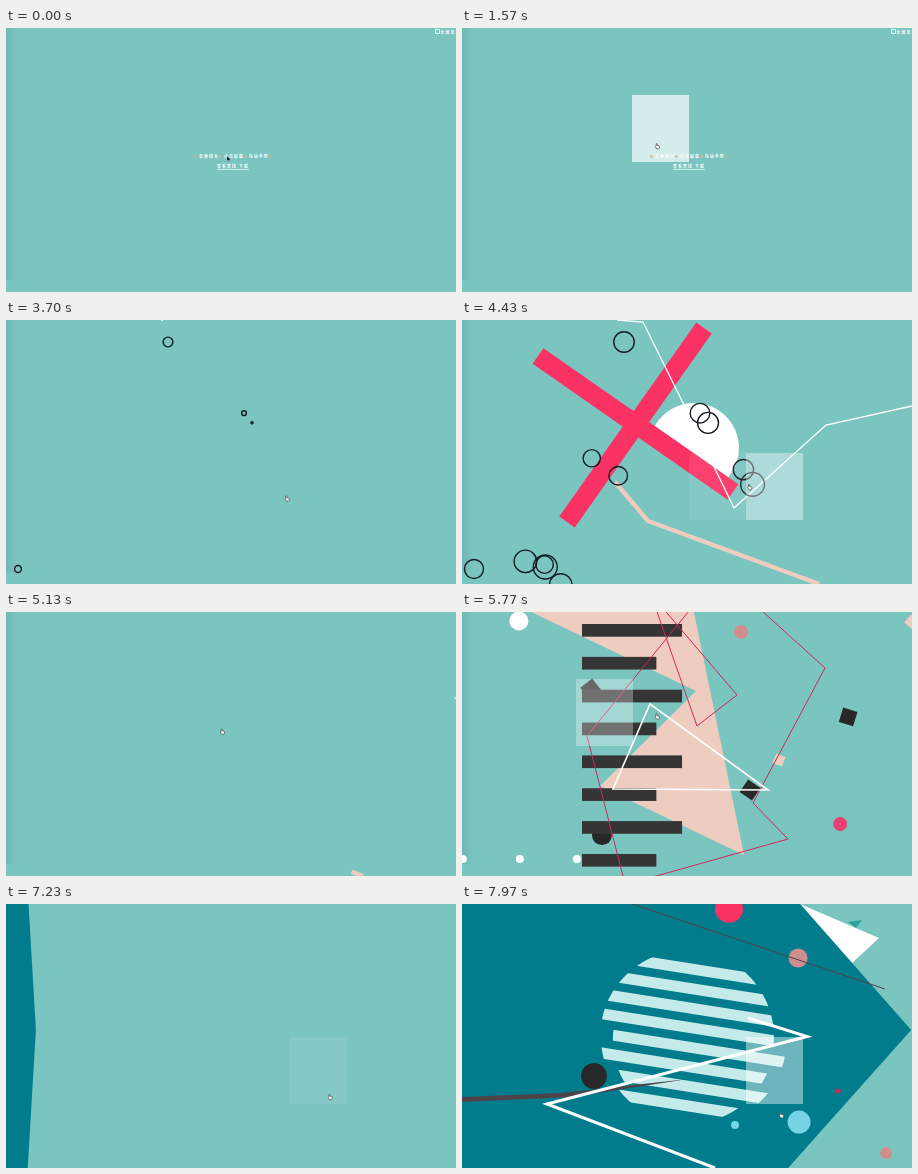
Write an HTML page with a canvas that moves like this. It is 450x264 px and loops after 8 s.

```html
<!DOCTYPE html>
<html lang="zh">
<head>
<meta charset="utf-8">
<title>Touch and play</title>
<style>
  html, body { margin: 0; width: 100%; height: 100%; overflow: hidden; background: #7bc5c1; }
  canvas, svg, #intro { position: absolute; left: 0; top: 0; }
  #intro { width: 450px; height: 264px; overflow: hidden; color: #fff;
    font: 700 4px/6px "Noto Sans CJK SC", "Noto Sans CJK", sans-serif; letter-spacing: 1px; white-space: nowrap; }
  #intro p { position: absolute; margin: 0; }
  #intro i { display: inline-block; width: 3px; height: 3px; margin: 0 2px 0 0; border-radius: 50%;
    background: #e8a582; opacity: .7; vertical-align: middle; }
  #intro u { text-decoration: underline .5px rgba(255,255,255,.6); }
  #intro b { display: inline-block; width: 2.6px; height: 2.6px; margin-right: 1px; border: .5px solid #dff; }
</style>
</head>
<body>
<canvas id="stage" width="450" height="264"></canvas>
<div id="intro">
  <p style="left:429px;top:1px"><b></b>全屏显示</p>
  <p style="left:188px;top:125px"><i></i>音量调大<i></i>点击屏幕<i></i>拖动手势<i></i></p>
  <p style="left:211px;top:135px"><u>查看查找 下载</u></p>
</div>
<svg width="8" height="8" stroke-width=".6">
  <path id="arrow" d="M0 0V5L1.2 4L2 5.8L2.9 5.4L2.2 3.7H3.7Z" fill="#111" stroke="#fff" stroke-width=".25"/>
  <path id="hand" d="M1.2 3V.6Q1.8 0 2.2 .7V2.3Q4.6 2.2 4.6 3.6Q4.7 5.7 3.7 6H1.8L.2 3.7Q.4 2.9 1.2 3Z" fill="#eee" stroke="#333"/>
</svg>
<script>
const ctx = document.getElementById('stage').getContext('2d');
const intro = document.getElementById('intro');
const pointer = document.querySelector('svg');
const arrow = document.getElementById('arrow');
const hand = document.getElementById('hand');

const LOOP = 8000, W = 450, H = 264, MID = [225, 132];
const BASE = '#7bc5c1', PALE = '#c4ebe9', DEEP = '#007c8c', BLUE = '#1192a9', DARK = '#4e4349', INK = '#353535',
      BLACK = '#282828', PEACH = '#efccc0', PINK = '#fa3364', RED = '#d0285a', ROSE = '#cf8e8d', SKY = '#77d3e6';

const span = (t, a, b) => Math.min(1, Math.max(0, (t - a) / (b - a)));
const out = u => 1 - (1 - u) ** 3;
const smooth = u => u * u * (3 - 2 * u);
const mix = (a, b, u) => a + (b - a) * u;
const noise = n => { const v = Math.sin(n * 12.9898) * 43758.5453; return v - Math.floor(v); };
const times = (n, fn) => Array.from({ length: n }, (_, i) => fn(i));
// Eased entry, then eased exit
const pulse = (t, a, b, c, d) => out(span(t, a, b)) * (1 - smooth(span(t, c, d)));
const zoom = (pts, k, [cx, cy] = MID) => pts.map(([x, y]) => [mix(cx, x, k), mix(cy, y, k)]);

function trace(pts) {
  ctx.beginPath();
  pts.forEach(p => ctx.lineTo(...p));
}
function poly(pts, color) {
  trace(pts);
  ctx.fillStyle = color;
  ctx.fill();
}
function outline(pts, color, width) {
  trace(pts);
  ctx.closePath();
  ctx.strokeStyle = color;
  ctx.lineWidth = width;
  ctx.stroke();
}
function rect(x, y, w, h, color) {
  ctx.fillStyle = color;
  ctx.fillRect(x, y, w, h);
}
function arc(x, y, r, color, from = 0, to = 7) {
  ctx.beginPath();
  ctx.arc(x, y, r, from, to);
  ctx.fillStyle = color;
  ctx.fill();
}
function square(x, y, size, angle, color) {
  ctx.save();
  ctx.translate(x, y);
  ctx.rotate(angle);
  rect(-size / 2, -size / 2, size, size, color);
  ctx.restore();
}
// Line whose head runs during a–b and whose tail follows during c–d
function sweep(t, a, b, c, d, pts, color, width) {
  const head = out(span(t, a, b)), tail = smooth(span(t, c, d));
  if (head <= tail) return;
  const len = pts.slice(1).reduce((sum, [x, y], i) => sum + Math.hypot(x - pts[i][0], y - pts[i][1]), 0);
  ctx.setLineDash([(head - tail) * len, len * 2]);
  ctx.lineDashOffset = -tail * len;
  trace(pts);
  ctx.strokeStyle = color;
  ctx.lineWidth = width;
  ctx.stroke();
  ctx.setLineDash([]);
}
// Bar that fills left to right, then empties the same way
function bar(y, h, fill, empty, color) {
  if (fill > empty) rect(120 + 214 * empty, y, 214 * (fill - empty), h, color);
}
function rings(t, start, end, color, centres, min, max) {
  const fade = 1 - span(t, end, end + 400);
  if (!fade) return;
  centres.forEach(([x, y], i) => {
    const from = start + i * 22, k = out(span(t, from, from + 420));
    if (!k) return;
    ctx.beginPath();
    ctx.arc(x, y, mix(min, max, noise(i + 3)) * k, 0, 7);
    ctx.strokeStyle = color;
    ctx.lineWidth = 1.4 * fade;
    ctx.stroke();
  });
}
// Returns a painter for bits that fly out of an origin and reach their places at the key time
function burst(t, start, key, end, origin = MID) {
  const live = t > start && t < end;
  const k = out(span(t, start, end)) / out(span(key, start, end));
  const scale = 1 - smooth(span(t, mix(key, end, .3), end));
  return (pts, size, color, angle) => live && zoom(pts, k, origin).forEach(([x, y], i) => {
    if (angle === undefined) arc(x, y, size * scale, color);
    else square(x, y, size * scale, angle + i * .3 + (t - key) * .0026, color);
  });
}

function bubbles(t) {
  rings(t, 1950, 3050, '#3a3743',
    [[169, 43], [279, 43], [365, 28], [436, 89], [65, 103], [369, 154], [94, 245]], 8, 14);
  // A wide zigzag arch
  const arch = times(11, i => {
    const u = i / 5 - 1;
    return [217 + 90 * u + 125 * u ** 3, 228 - 150 * Math.sin(Math.PI * i / 10) * (i % 2 ? 1 : .45)];
  });
  rings(t, 2150, 3050, '#1aa294', arch, 4, 10);
  const k = pulse(t, 2350, 2850, 3150, 3550);
  poly(zoom([[169, 104], [243, 87], [267, 104], [257, 148], [258, 167], [216, 179], [163, 156]], k), BLUE);
}

function strike(t) {
  arc(232, 128, 45 * pulse(t, 3750, 4150, 4650, 4950), '#fff', Math.PI * 1.12, Math.PI * 2.27);
  sweep(t, 3800, 4150, 4700, 5000, [[242, 8], [105, 202]], PINK, 19);
  sweep(t, 3950, 4350, 4800, 5100, [[76, 36], [271, 172]], PINK, 19);
  sweep(t, 3700, 4350, 4600, 5150,
    [[155, 0], [181, 2], [222, 85], [272, 188], [364, 105], [450, 86]], '#fff', 1.3);
  sweep(t, 3850, 4420, 4700, 5200, [[153, 162], [186, 201], [357, 264]], PEACH, 4.3);
  // Rings come in loose pairs
  const pairs = [[242, 98], [143, 147], [286, 157], [73, 243], [91, 256]]
    .flatMap(([x, y], i) => [-1, 1].map(s => [x + s * mix(4, 14, noise(i)), y + s * mix(0, 9, noise(i + 9))]));
  rings(t, 3620, 4560, '#171c20', [[162, 22], [12, 249], ...pairs], 8, 12);
}

function prism(t) {
  const clay = pulse(t, 5150, 5600, 5900, 6250);
  poly(zoom([[40, -14], [229, -14], [282, 243], [138, 174], [234, 79]], clay), PEACH);

  const bits = burst(t, 5250, 5770, 6300);
  bits([[57, 9]], 9.5, '#fff');
  bits([[279, 20]], 7, ROSE);
  bits([[378, 212]], 7, '#e8406f');
  bits([[140, 223]], 10, BLACK);
  bits([[386, 105], [288, 178], [129, 77]], 15, BLACK, .3);
  bits([[317, 148], [449, 10]], 10, PEACH, .4);
  bits(times(3, i => [1 + 57 * i, 247]), 4, '#fff');

  for (let i = 0; i < 8; i++) {
    const from = i % 2 ? 5632 : 5584;
    bar(12 + i * 32.85, 12.7, span(t, from, from + 400), span(t, from + 400, from + 800), INK);
  }

  const grow = span(t, 5350, 5770) ** 2 + 5 * span(t, 5770, 6270) ** 2;
  if (!grow || t > 6270) return;
  outline(zoom([[288, -12], [363, 56], [291, 191], [326, 227], [180, 268], [162, 268], [125, 124], [236, -12]],
    grow), RED, 1);
  outline(zoom([[193, -6], [235, 114], [275, 83], [199, -6]], grow), RED, 1);
  outline(zoom([[188, 92], [306, 178], [151, 177]], grow), '#fff', 1.6);
}

function pistons(t) {
  const left = W * (1 - smooth(span(t, 6030, 6300))), right = W * (1 - smooth(span(t, 6780, 7080)));
  if (right > left) rect(left, 0, right - left, H, PALE);
  const rise = pulse(t, 6300, 6530, 6700, 7000);
  poly([[0, H - 73 * rise], [W, H], [0, H]], DARK);

  for (let i = 0; i < 3; i++) {
    const from = 6030 + i * 103;
    bar(34 + i * 79.7, 39, out(span(t, from, from + 400)), span(t, from + 392, from + 792), DEEP);
  }
  const bits = burst(t, 6150, 6530, 7080, [225, 200]);
  bits([[192, 67], [267, 70], [152, 130], [301, 136]], 14, DARK, .65);
  bits([[187, 196]], 6, DARK, .1);
  bits(times(5, i => [94 + 70 * i, i % 2 ? 245 : 258]), 10.5, SKY, -.2);
  bits([[209, 237]], 7, BLUE, .8);
  bits([[233, 237]], 6, PEACH, 0);
  sweep(t, 6150, 6500, 6650, 7050, [[320, 39], [404, 89], [80, 178], [117, 264]], BLUE, 1.3);
  sweep(t, 6200, 6520, 6700, 7050, [[152, 129], [52, 178], [146, 264]], '#d8406f', 1.2);
}

function stripes(t) {
  for (let i = 0; i < 8; i++) {
    const k = out(span(t, 7420 + i * 20, 7800 + i * 20));
    ctx.save();
    ctx.translate(225, 133);
    ctx.rotate(.156);
    if (i > 3) ctx.translate(i % 2 ? 1 : 13, 0);
    ctx.beginPath();
    ctx.arc(0, 0, 87, 0, 7);
    ctx.clip();
    rect(-87, (i - 3.5) * 19.4 - 5.5, 174 * k, 11, PALE);
    ctx.restore();
  }
}

function finale(t) {
  if (t < 7200) return;
  const corner = [338, 0], open = out(span(t, 7300, 7650));
  poly(zoom([[386, 18], [400, 16], [394, 24]], open, corner), '#2aa394');
  poly(zoom([corner, [417, 34], [390, 59]], open, corner), '#fff');

  const slide = u => 1 - (1 - u) ** 2;
  const reach = slide(span(t, 7200, 8150)) / slide(span(7970, 7200, 8150));
  poly([[0, 0], [338 * reach, 0], [449 * reach, 126], [326 * reach, H], [0, H]], DEEP);
  stripes(t);

  const tail = out(span(t, 7450, 7850));
  poly(zoom([[0, 193], [100, 189], [226, 175], [110, 193], [0, 198]], tail, [0, 195]), DARK);
  const bits = burst(t, 7350, 7970, 8500);
  bits([[267, 5]], 14, PINK);
  bits([[336, 54]], 9.5, ROSE);
  bits([[424, 249]], 6, ROSE);
  bits([[132, 172]], 13, BLACK);
  bits([[337, 218]], 11.5, SKY);
  bits([[273, 221]], 4, SKY);
  bits([[376, 187]], 2.5, RED);
  sweep(t, 7300, 7900, 8100, 8500, [[170, 0], [423, 85]], DARK, 1);
  sweep(t, 7450, 7960, 8100, 8500, [[286, 114], [345, 132.5], [85, 200], [253, 264]], '#fff', 3);
}

// Column, row and time of each touch
const taps = [[3, 1, 1545], [3, 2, 2590], [4, 2, 2590], [4, 2, 3710], [5, 2, 4065],
  [2, 1, 5313], [5, 2, 6505], [5, 2, 7660]];

function cells(t) {
  for (const [col, row, start] of taps) {
    if (t < start || t > start + 800) continue;
    rect(Math.round(col * 56.8), Math.round(row * 66.7), 57, 67,
      `rgba(255,255,255,${.7 * (1 - span(t, start, start + 800))})`);
  }
}

const route = [[0, 221, 128], [400, 260, 134], [1000, 193, 115], [2100, 193, 115], [2900, 196, 176],
  [4050, 302, 175], [5650, 185, 97], [6500, 326, 173], [LOOP, 317, 208]];

function movePointer(t) {
  const i = route.findIndex(p => p[0] > t);
  const [from, x, y] = route[i - 1], [to, nx, ny] = route[i];
  const u = smooth(span(t, from, to));
  pointer.style.transform = `translate(${mix(x, nx, u)}px,${mix(y, ny, u)}px)`;
  arrow.style.opacity = +(t < 1100);
  hand.style.opacity = +(t >= 1100);
}

const edge = ctx.createLinearGradient(0, 0, 12, 0);
edge.addColorStop(0, 'rgba(40,90,95,.13)');
edge.addColorStop(1, 'rgba(40,90,95,0)');

function draw(t) {
  rect(0, 0, W, H, BASE);
  rect(0, 0, 12, 252, edge);
  bubbles(t);
  strike(t);
  prism(t);
  pistons(t);
  finale(t);
  cells(t);
  intro.style.opacity = 1 - span(t, 1620, 1950);
  movePointer(t);
}

const begin = performance.now();
function tick() {
  draw((performance.now() - begin) % LOOP);
  requestAnimationFrame(tick);
}
tick();
</script>
</body>
</html>
```
